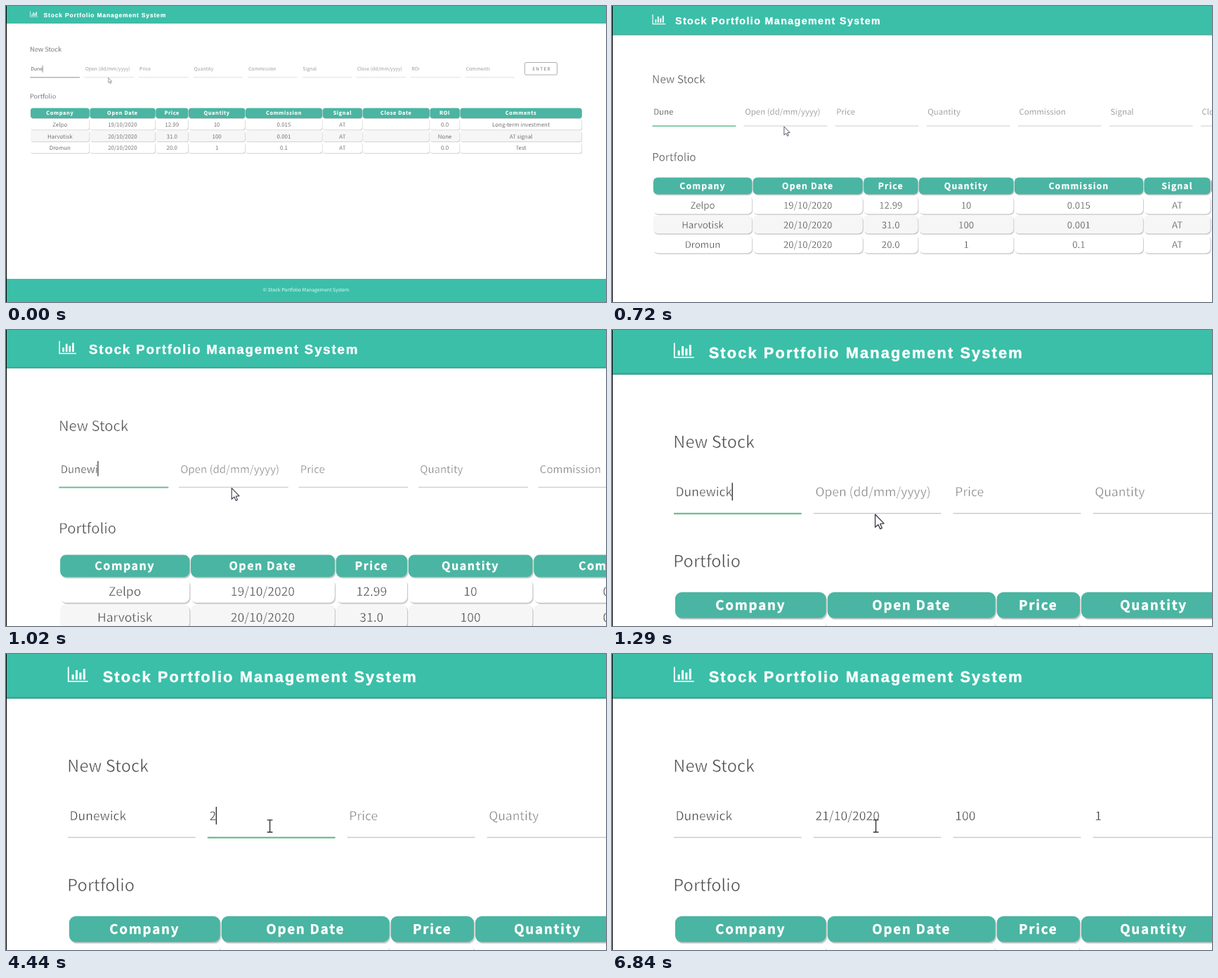
An HTML page for the animation above (8 s loop, 854x422 px).

```html
<!DOCTYPE html>
<html lang="en">
<head>
<meta charset="utf-8">
<title>Stock Portfolio</title>
<style>
  html, body { margin: 0; width: 100%; height: 100%; overflow: hidden; background: #fff; }
  svg { display: block; width: 100vw; height: 100vh; }
  text {
    font-family: "Noto Sans CJK JP", "Noto Sans CJK SC", "Noto Sans CJK", "Open Sans", sans-serif;
    font-weight: 300;
    text-rendering: geometricPrecision;
    white-space: pre;
    stroke-width: .022em;
  }
  .title { font: bold 8.5px "Liberation Sans", Arial, sans-serif; letter-spacing: .82px; fill: #fff; stroke: #fff; }
  /* A background-coloured outline thins the strokes to a light weight */
  .head, .input, .hint { stroke: #fff; }
  .head { font-size: 9.18px; fill: #4e4e4e; }
  .input { font-size: 6.82px; fill: #464646; }
  .hint { font-size: 6.82px; fill: #868686; }
  .button { font-size: 6.4px; letter-spacing: 1.35px; fill: #777; }
  .th { font-size: 7.3px; font-weight: 700; letter-spacing: .68px; fill: #fff; }
  .td { font-size: 7.93px; fill: #4e4e4e; }
  .foot { font-size: 6.87px; fill: #e4f7f3; }
  .mid { text-anchor: middle; }
</style>
</head>
<body>
<svg viewBox="0 0 854 422">
  <g id="page">
    <rect width="854" height="24.2" fill="#3bbfa9"/>
    <rect y="24" width="854" height=".8" fill="#359c8a"/>
    <path transform="translate(34.2 7.2) scale(.7)" fill="#fff"
      d="M0 0h1v11h15v1H0zM3.2 6h1.7v4H3.2zM6.2 2.5h1.7V10H6.2zM9.2 4.5h1.7V10H9.2zM12.2 1.5h1.7V10h-1.7z"/>
    <text class="title" x="53.6" y="15.6">Stock Portfolio Management System</text>
    <text class="head" x="34" y="65.4">New Stock</text>
    <text class="head" x="34" y="131.6">Portfolio</text>
    <g id="form"></g>
    <rect x="738.4" y="80.5" width="46" height="17.6" rx="1.8" fill="none" stroke="#999" stroke-width=".8"/>
    <text class="button mid" x="762.6" y="91.9">ENTER</text>
    <g id="table"></g>
    <rect y="389" width="854" height="33" fill="#3bbfa9"/>
    <text class="foot mid" x="427" y="407.4">© Stock Portfolio Management System</text>
    <rect id="caret" y="84.8" width=".5" height="9.8" fill="#222"/>
    <path id="arrow" d="M0 0V7.2L1.7 5.7L2.8 8.1L3.8 7.6L2.8 5.3L4.9 5.1Z"
      fill="#fff" stroke="#3a3a48" stroke-width=".5" stroke-linejoin="round"/>
    <path id="beam" d="M-1.5 -3.4H1.5M0 -3.4V3.4M-1.5 3.4H1.5" fill="none" stroke="#333" stroke-width=".55"/>
  </g>
  <rect width="1" height="422" fill="#000"/>
</svg>
<script>
const LOOP = 8000, ZOOM = 2.569;
const GREEN = "#62bd8c";
const $ = id => document.getElementById(id);

function add(parent, tag, attrs, text) {
  const node = document.createElementNS("http://www.w3.org/2000/svg", tag);
  for (const k in attrs) node.setAttribute(k, attrs[k]);
  if (text) node.textContent = text;
  parent.append(node);
  return node;
}

// Form fields
const hints = ["", "Open (dd/mm/yyyy)", "Price", "Quantity", "Commission", "Signal",
  "Close (dd/mm/yyyy)", "ROI", "Comments"];
const fields = hints.map((hint, i) => {
  const left = 34.25 + 77.42 * i, x = left + 1;
  const form = $("form"), at = { x, y: 92.4 }, line = { x: left, y: 101.5, width: 70.7 };
  add(form, "rect", { ...line, height: .56, fill: "#cacaca" });
  return {
    x,
    line: add(form, "rect", { ...line, height: .8, fill: GREEN, opacity: 0 }),
    hint: add(form, "text", { class: "hint", ...at }, hint),
    value: add(form, "text", { class: "input", ...at })
  };
});
const [company, opened, price, quantity] = fields;
price.value.textContent = "100";
quantity.value.textContent = "1";

// Table
const cols = [35, 119.4, 213.2, 260, 341, 450.8, 507.8, 603.5, 646.5, 820.3];
const rows = [
  ["Company", "Open Date", "Price", "Quantity", "Commission", "Signal", "Close Date", "ROI", "Comments"],
  ["Zelpo", "19/10/2020", "12.99", "10", "0.015", "AT", "", "0.0", "Long-term investment"],
  ["Harvotisk", "20/10/2020", "31.0", "100", "0.001", "AT", "", "None", "AT signal"],
  ["Dromun", "20/10/2020", "20.0", "1", "0.1", "AT", "", "0.0", "Test"]
];
rows.forEach((row, r) => row.forEach((label, c) => {
  const x = cols[c], width = cols[c + 1] - x - .8, table = $("table");
  const y = r ? 161 + 16.63 * (r - 1) : 145.5;
  const height = r ? 15.5 : 14.4;
  const fill = r === 0 ? "#4ab5a2" : r === 2 ? "#f6f6f6" : "#fff";
  const box = { width, height, rx: 3.7 };
  add(table, "rect", { x: x + .7, y: y + 1, ...box, fill: "#e2e2e2" });
  add(table, "rect", { x: x + .4, y: y + .6, ...box, fill: "#c4c4c4" });
  add(table, "rect", { x, y, ...box, fill });
  add(table, "text", {
    class: (r ? "td" : "th") + " mid",
    x: x + width / 2,
    y: r ? y + 11.2 : 155.4,
    stroke: r ? fill : "#fff"
  }, label);
}));

// Typing: [time, text, caret shown]
const nameKeys = [
  [0, "Dune", 1], [420, "Dune", 0], [810, "Dunew", 1], [960, "Dunewi", 1],
  [1140, "Dunewic", 1], [1290, "Dunewick", 1], [1850, "Dunewick", 0],
  [2350, "Dunewick", 1], [2720, "Dunewick", 0]
];
const dateKeys = [
  [0, "", 0], [2910, "", 1], [3250, "", 0], [3780, "", 1], [4310, "", 0],
  [4440, "2", 1], [4600, "21", 1], [4830, "21/", 1], [5330, "21/1", 1],
  [5760, "21/10", 1], [6090, "21/10/", 1], [6250, "21/10/2", 1], [6780, "21/10/2020", 0]
];
const keyAt = (keys, t) => keys.filter(k => k[0] <= t).pop();
const ramp = (t, from, to) => Math.min(1, Math.max(0, (t - from) / (to - from)));
const fade = (node, v) => node.setAttribute("opacity", v);
const move = (node, x, y) => node.setAttribute("transform", `translate(${x} ${y})`);

function type(field, keys, t) {
  const [, text, on] = keyAt(keys, t);
  if (field.value.textContent !== text) field.value.textContent = text;
  if (on) {
    const w = text ? field.value.getComputedTextLength() : 0;
    $("caret").setAttribute("x", field.x + w - .2);
    fade($("caret"), 1);
  }
  return text;
}

function draw(t) {
  // The zoom advances in 30 ms steps
  const step = t < 360 ? 0 : Math.min(30, Math.floor((t - 360) / 30) + 1);
  $("page").setAttribute("transform", `scale(${1 + (ZOOM - 1) * step / 30})`);

  fade($("caret"), 0);
  type(company, nameKeys, t);
  const date = type(opened, dateKeys, t);
  fade(opened.hint, date ? 0 : 1);

  const focus = ramp(t, 2720, 2910);
  const done = t < 6780 ? 0 : t < 6840 ? .5 : 1;
  company.line.setAttribute("fill", t < 360 ? "#7d8a85" : GREEN);
  fade(company.line, 1 - focus);
  fade(opened.line, focus * (1 - done));
  for (const f of [price, quantity]) {
    fade(f.value, done);
    fade(f.hint, 1 - done);
  }

  const go = ramp(t, 2510, 2690), y = 102.3 - 6.8 * go;
  const inside = y < 101;
  move($("arrow"), 145.8, y);
  move($("beam"), 146.2, y);
  fade($("arrow"), inside ? 0 : 1);
  fade($("beam"), inside ? 1 : 0);
}

const start = performance.now();
function tick() {
  draw((performance.now() - start) % LOOP);
  requestAnimationFrame(tick);
}
tick();
</script>
</body>
</html>
```
